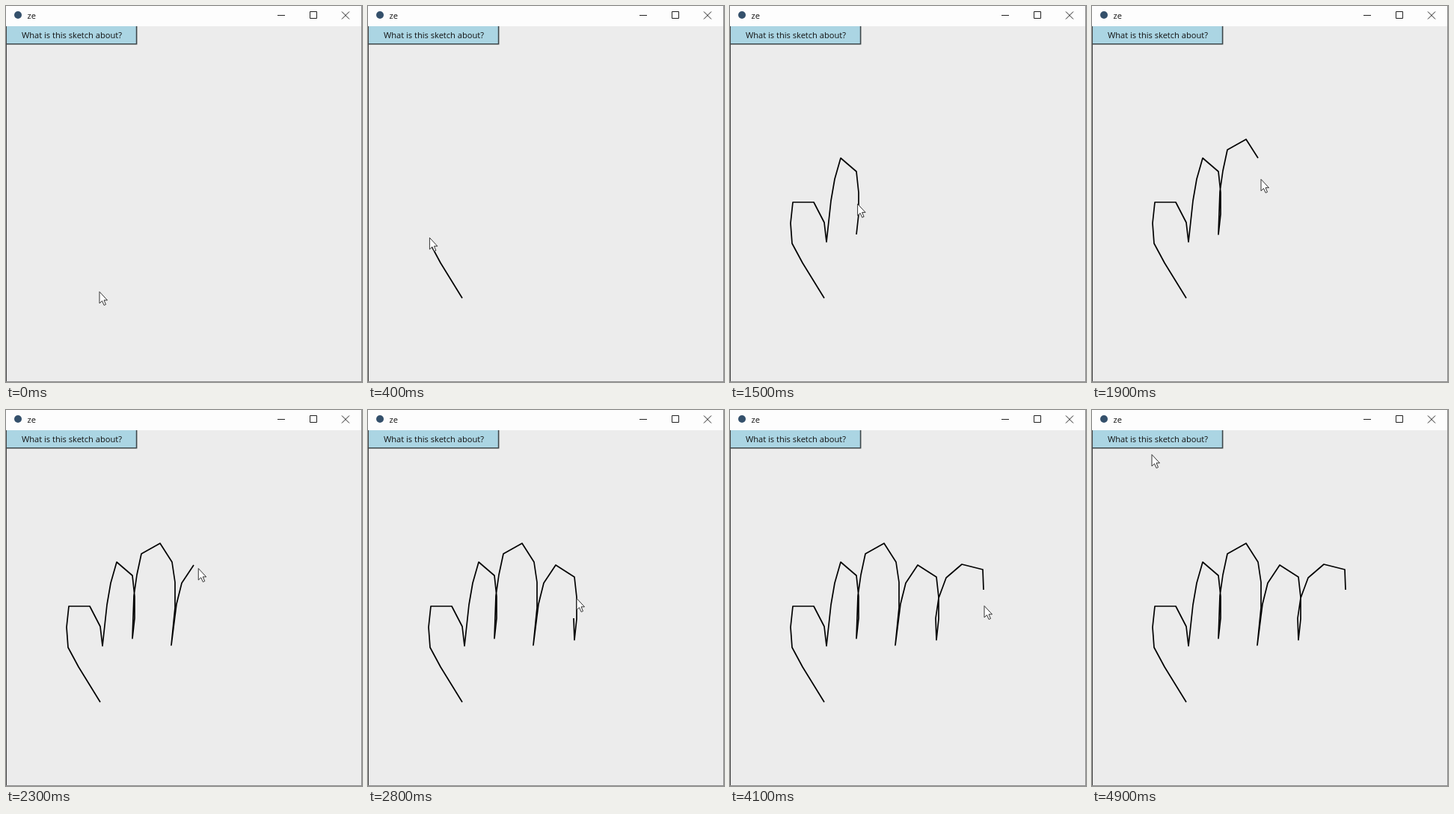
These frames come from a looping animation (476x502 px, 5000 ms). An HTML page:

```html
<!DOCTYPE html>
<html lang="en">
<head>
<meta charset="utf-8">
<title>Sketch window</title>
<style>
html, body { margin: 0; width: 100%; height: 100%; overflow: hidden; background: #ececec; }
svg { display: block; }
text { font: 11.1px "Open Sans", "Noto Sans", sans-serif; fill: #111; }
</style>
</head>
<body>
<svg width="476" height="502" viewBox="0 0 476 502">
  <rect width="476" height="502" fill="#ececec"/>
  <rect width="476" height="27" fill="#fdfdfd"/>
  <path d="M.5 27V502" stroke="#444"/>
  <path d="M475.5 0V502M0 501.5H476" stroke="#8c8c8c"/>

  <circle cx="16" cy="12" r="5" fill="#34506b"/>
  <text x="28.5" y="17">ze</text>
  <path d="M363 12.5H373M406.5 7.5h9v9h-9zM449 7.5l10 10M459 7.5l-10 10" fill="none" stroke="#222"/>

  <rect x="1" y="27" width="174" height="24" fill="#abd5e3"/>
  <path d="M1 50.7H174.6V27" fill="none" stroke="#3c4649" stroke-width="1.6"/>
  <text x="21" y="43">What is this sketch about?</text>

  <polyline id="line" fill="none" stroke="#000" stroke-width="1.7" stroke-linejoin="round"/>
  <path id="cursor" d="M0 .5V16L3.5 12.7 6.1 18.5 8.5 17.5 6 11.8H10.5Z" fill="#fff" stroke="#333"/>
</svg>
<script>
const LOOP = 5000, STEP = 100, LAG = 0.2, DIP = 22;
const line = document.getElementById("line");
const cursor = document.getElementById("cursor");

// Pointer route; all but its two ends become vertices of the hand
const route = `125,381 126,390 97,343 83,317 81,290 84,262 112,262 126,289 129,315
  135,260 140,231 148,203 169,221 172,249 172,278 169,305
  171,248 175,220 181,192 206,178 222,203 226,230 226,264 221,314
  228,259 235,231 251,207 276,223 279,250 279,279 276,307
  275,278 279,251 289,224 310,206 338,213 339,240 340,261`
  .split(/\s+/).map(p => p.split(",").map(Number));

// [time, position along the route]
const pace = [[0, 0], [200, 1], [900, 9.05], [1500, 15.8], [2300, 26.25],
  [3000, 34.3], [3300, 35.05], [3600, 37]];

const clamp = v => Math.min(1, Math.max(0, v));
const mix = (a, b, f) => a + (b - a) * f;

function position(t) {
  const i = pace.findIndex(k => k[0] > t);
  if (i < 0) return route.length - 1;
  const [t0, u0] = pace[i - 1], [t1, u1] = pace[i];
  return mix(u0, u1, (t - t0) / (t1 - t0));
}

const isValley = (p, i) =>
  i > 1 && i < route.length - 1 && p[1] > route[i - 1][1] && p[1] > route[i + 1][1];

// The hand swings a little too low between two fingers
const overshoot = u => route.reduce((sum, p, i) =>
  sum + (isValley(p, i) ? DIP * clamp(1 - Math.abs(u - i)) : 0), 0);

function along(u) {
  const i = Math.min(Math.floor(u), route.length - 2);
  const [a, b] = [route[i], route[i + 1]];
  return [mix(a[0], b[0], u - i), mix(a[1], b[1], u - i) + overshoot(u)];
}

// Curved way from the end of the drawing to the button
function leave(t) {
  const p = clamp((t - 4200) / 650), s = p * p * (3 - 2 * p);
  const bend = (a, c, b) => mix(mix(a, c, s), mix(c, b, s), s);
  return [bend(340, 260, 80), bend(261, 378, 59)];
}

function draw() {
  const t = Math.floor(performance.now() % LOOP / STEP) * STEP;
  const u = position(t);
  const [x, y] = t < 4200 ? along(u) : leave(t);
  line.setAttribute("points", route.slice(1, Math.max(1, Math.floor(u - LAG) + 1)).join(" "));
  cursor.setAttribute("transform", `translate(${x} ${y})`);
  requestAnimationFrame(draw);
}
draw();
</script>
</body>
</html>
```
